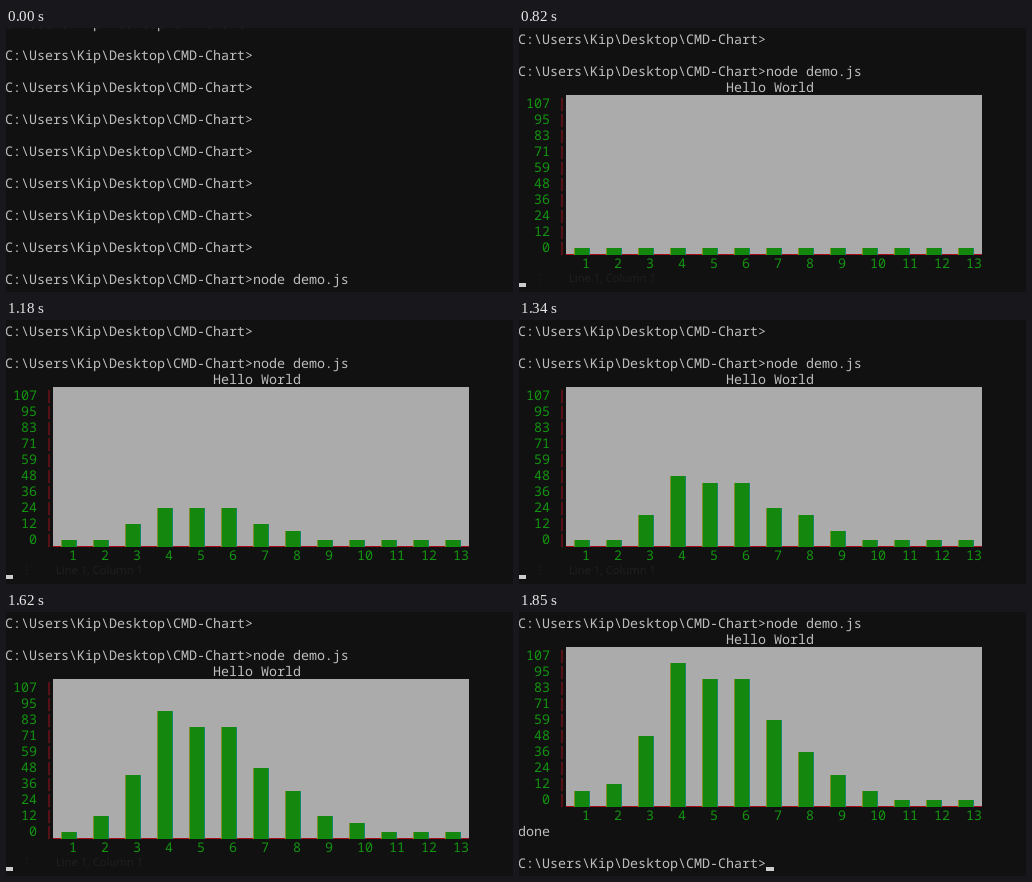
Write an HTML page that moves like this. It is 507 px wide and 264 px high and loops after 2690 ms.

```html
<!DOCTYPE html>
<html lang="en">
<head>
<meta charset="utf-8">
<title>Console chart</title>
<style>
  html, body { margin: 0; width: 100%; height: 100%; overflow: hidden; background: #111; }
  svg { display: block; width: 507px; height: 264px; }
  text {
    font: 13.3333px "Noto Sans Mono", "Liberation Mono", monospace;
    white-space: pre;
    text-rendering: geometricPrecision;
  }
  #status text { font: 11.2px "Open Sans", "Noto Sans", sans-serif; }
</style>
</head>
<body>
<svg id="stage" viewBox="0 0 507 264">
  <rect width="507" height="264" fill="#111"/>
  <g id="status" fill="#202020">
    <text x="15" y="254">⋮</text>
    <text x="50" y="254">Line 1, Column 1</text>
  </g>
  <g id="log">
    <g id="chart"></g>
    <g id="end"></g>
  </g>
  <rect id="cursor" width="8" height="4" fill="#ccc"/>
</svg>
<script>
const LOOP = 2690, CELL_W = 8, CELL_H = 16;
const GREY = '#bebebe', PANEL = '#ababab', GREEN = '#14870f', LABEL = '#139410', RED = '#a50d1a';
const PROMPT = 'C:\\Users\\Kip\\Desktop\\CMD-Chart>';
const $ = id => document.getElementById(id);
const colX = col => col * CELL_W - 1;
const rowY = row => row * CELL_H + 3;

function add(parent, tag, attrs) {
  const el = document.createElementNS('http://www.w3.org/2000/svg', tag);
  for (const key in attrs) el.setAttribute(key, attrs[key]);
  return parent.appendChild(el);
}
const rect = (parent, x, y, width, height, fill) =>
  add(parent, 'rect', { x, y, width, height, fill });

function print(parent, row, col, str, fill = GREY) {
  add(parent, 'text', { x: colX(col), y: rowY(row) + 13, fill }).textContent = str;
}

// The console is one long log that scrolls up by whole rows.
const log = $('log'), chart = $('chart'), end = $('end'), cursor = $('cursor');
for (let row = -1; row < 15; row += 2) print(log, row, 0, PROMPT);
print(log, 15, 0, PROMPT + 'node demo.js');

const TOP = rowY(17), BASE = rowY(27), LEFT = colX(6);
print(chart, 16, 26, 'Hello World');
rect(chart, LEFT, TOP, 52 * CELL_W, BASE - TOP, PANEL);
rect(chart, LEFT, BASE - 1, 52 * CELL_W, 1, RED);
[107, 95, 83, 71, 59, 48, 36, 24, 12, 0].forEach((n, i) => {
  print(chart, 17 + i, 1, String(n).padStart(3), LABEL);
  print(chart, 17 + i, 5, '|', '#a0111e');
});

// Bar heights in half rows.
const DATA = [1.5, 2.9, 8.55, 18.2, 16.2, 15.58, 10.6, 7, 3.8, 1.9, 1, 1, 1];
const bars = DATA.map((size, i) => {
  const x = colX(7 + i * 4);
  print(chart, 27, 8 + i * 4, String(i + 1), LABEL);
  return {
    size,
    parts: [
      rect(chart, x, BASE, 16, 0, GREEN),
      rect(chart, x, BASE, 1, 0, '#828c28'),
      rect(chart, x + 15, BASE, 1, 0, '#148768')
    ]
  };
});
const trace = add(chart, 'g', {});
for (const x of [55, 70]) rect(trace, x, BASE - 16, 1, 9, '#3f9a8a');

print(end, 28, 0, 'done');
print(end, 30, 0, PROMPT);

// Redraw times and growth of the bars over time.
const STEPS = [820, 970, 1020, 1075, 1130, 1180, 1220, 1265, 1310, 1355, 1400, 1445, 1490,
  1520, 1580, 1630, 1680, 1720, 1760, 1800, 1850];
const GROWTH = [[820, 0], [970, .085], [1180, .295], [1520, .865], [1800, .995], [1850, 1]];

function growth(t) {
  const i = GROWTH.findIndex(p => p[0] >= t);
  if (i < 1) return i ? 1 : 0;
  const [t0, a] = GROWTH[i - 1], [t1, b] = GROWTH[i];
  return a + (b - a) * (t - t0) / (t1 - t0);
}

// A half block glyph is 7 px tall in a 16 px row.
const barHeight = half => Math.floor(half / 2) * CELL_H + half % 2 * 7;

function setHeight(el, h) {
  el.setAttribute('y', BASE - h);
  el.setAttribute('height', h);
}
const show = (el, on) => { el.style.display = on ? '' : 'none'; };

function render(t) {
  const started = t >= 690, drawn = t >= 820, done = t >= 1850;
  const scroll = done ? 15 : drawn ? 13 : started ? 1 : 0;
  log.setAttribute('transform', `translate(0 ${-scroll * CELL_H})`);
  show($('status'), started && !done);
  show(chart, drawn);
  show(end, done);
  show(trace, t >= 1800 && !done);
  show(cursor, started);
  cursor.setAttribute('x', colX(done ? PROMPT.length : 0));
  cursor.setAttribute('y', rowY(15) + 12);
  if (!drawn) return;

  const k = growth(STEPS.filter(s => s <= t).pop());
  for (const { size, parts } of bars) {
    const h = barHeight(Math.max(1, Math.round(size * k)));
    for (const part of parts) setHeight(part, h);
  }
}

const start = performance.now();
function tick() {
  render((performance.now() - start) % LOOP);
  requestAnimationFrame(tick);
}
tick();
</script>
</body>
</html>
```
